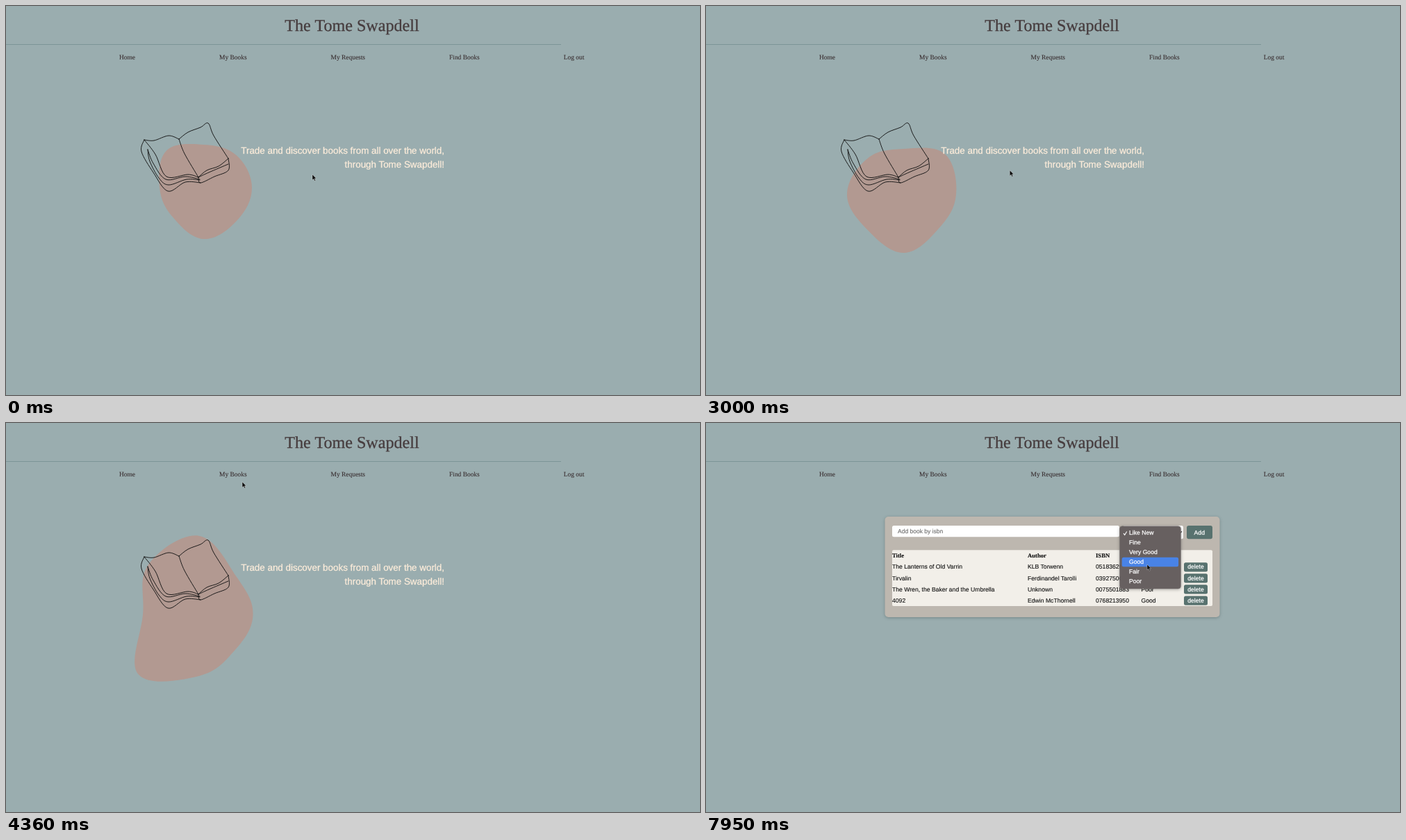
An HTML page that plays this animation: 999x561 px, repeating every 8 s.

```html
<!DOCTYPE html>
<html lang="en">
<head>
<meta charset="utf-8">
<title>The Tome Swapdell</title>
<style>
  html, body { margin: 0; width: 100%; height: 100%; overflow: hidden; background: #9aadaf; }
  svg { display: block; width: 100%; height: 100%; text-rendering: geometricPrecision; }
  text {
    font: 8.63px "Liberation Sans", Arial, sans-serif; color: #111;
    fill: currentColor; stroke: currentColor; stroke-width: .12;
  }
  .serif { font-family: "Liberation Serif", Times, serif; }
  .title { font-size: 24.1px; color: #463c3e; stroke-width: .3; }
  .nav { font-size: 9.43px; color: #3a3032; }
  .hero { font-size: 13.4px; color: #faebd9; text-anchor: end; stroke-width: .3; }
  .head { font-weight: bold; }
  .hint { font-size: 8.5px; color: #6c6c6c; }
  .light { color: #fff; stroke-width: .25; }
  .mid { text-anchor: middle; }
  .panel { filter: drop-shadow(0 1px 2px rgba(60, 75, 75, .4)); }
  .menu { filter: drop-shadow(0 1px 2px rgba(0, 0, 0, .3)); }
</style>
</head>
<body>
<svg viewBox="0 0 999 561">
  <text class="serif title mid" x="498" y="35.6">The Tome Swapdell</text>
  <path d="M0 55.5H799" stroke="#7c9597"/>
  <text class="serif nav" id="nav" x="163" y="77.4"></text>

  <g id="home">
    <path id="blob" fill="#b29991"/>
    <path id="book" fill="none" stroke="#151515" stroke-width=".95" stroke-linecap="round" stroke-linejoin="round"/>
    <text class="hero" x="631" y="212.6">Trade and discover books from all over the world,</text>
    <text class="hero" x="631" y="233">through Tome Swapdell!</text>
  </g>

  <g id="books">
    <rect class="panel" x="257.5" y="135" width="482" height="145" rx="5" fill="#bdb7af"/>
    <rect x="268" y="148" width="327" height="16.3" rx="2.5" fill="#fff"/>
    <text class="hint" x="276" y="159">Add book by isbn</text>
    <rect x="600" y="148" width="87" height="19.3" rx="2.5" fill="#fff"/>
    <text x="608" y="160.6" style="font-size:9.2px">Like New</text>
    <path d="M679.8 156.4l2.5 2.6 2.5-2.6" fill="none" stroke="#222" stroke-width="1.3"/>
    <rect x="692" y="148" width="37" height="19.3" rx="3" fill="#58726f"/>
    <text class="light mid" x="710.3" y="160.6">Add</text>
    <rect x="268" y="183.3" width="461" height="80.6" rx="2" fill="#f2efe9"/>
    <g id="table"></g>
  </g>

  <g id="menu">
    <rect class="menu" x="595.5" y="148.7" width="88" height="90.3" rx="4" fill="#676060" stroke="#7b7474" stroke-width=".5"/>
    <rect id="pick" x="598.7" width="81.4" height="13.6" rx="2.5" fill="#4983e6"/>
    <path d="M601 159.2l1.7 2.3 3-5" fill="none" stroke="#fff" stroke-width="1.1"/>
    <g id="items"></g>
  </g>

  <path id="cursor" d="M0 0V8L1.9 6.3L3.2 9.2L4.5 8.6L3.2 5.8H5.6Z" fill="#080808" stroke="#fff" stroke-opacity=".65" stroke-width=".5"/>
</svg>
<script>
const $ = id => document.getElementById(id);
const label = (x, y, text, cls = "") => `<text x="${x}" y="${y}" class="${cls}">${text}</text>`;
const clamp = v => Math.min(1, Math.max(0, v));
const ease = p => p * p * (3 - 2 * p);
const mix = (a, b, k) => a.map((v, i) => v + (b[i] - v) * k);

// Smooth curve through points, open or closed
function curve(points, closed) {
  const n = points.length;
  const at = i => points[closed ? (i + n) % n : Math.min(n - 1, Math.max(0, i))];
  const handle = (i, s) => at(i).map((v, j) => v + s * (at(i + 1)[j] - at(i - 1)[j]));
  const tension = closed ? .1875 : 1 / 6;
  let d = "M" + points[0];
  for (let i = 0; i < (closed ? n : n - 1); i++)
    d += `C${handle(i, tension)} ${handle(i + 1, -tension)} ${at(i + 1)}`;
  return d;
}

$("nav").innerHTML = ["Home", "My Books", "My Requests", "Find Books", "Log out"]
  .map((name, i) => `<tspan dx="${i && 121}">${name}</tspan>`).join("");

const columns = [268, 463, 561, 626.5];
const rows = [
  ["Title", "Author", "ISBN", "Condition"],
  ["The Lanterns of Old Varrin", "KLB Torwenn", "0518362947", "Like New"],
  ["Tirvalin", "Ferdinandel Tarolli", "0392750618", "Very Good"],
  ["The Wren, the Baker and the Umbrella", "Unknown", "0075501883", "Poor"],
  ["4092", "Edwin McThornell", "0768213950", "Good"]
];
$("table").innerHTML = rows.map((row, r) => {
  const y = 194.4 + r * 16.07;
  const cells = row.map((text, c) => label(columns[c], y, text, r ? "" : "serif head")).join("");
  return r ? cells + `<rect x="688" y="${y - 9.3}" width="34" height="13.3" rx="2.5" fill="#58726f"/>`
    + label(705, y, "delete", "light mid") : cells;
}).join("");

const itemTop = 151.9, itemStep = 13.95;
$("items").innerHTML = ["Like New", "Fine", "Very Good", "Good", "Fair", "Poor"]
  .map((name, i) => label(609, itemTop + 9.5 + i * itemStep, name, "light")).join("");

// Pen strokes of the open book
$("book").setAttribute("d", [
  "199,193 213,194 234,187 249,192",
  "249,192 262,182 280,175 291,169 299,187 320,220",
  "249,192 257,213 277,247",
  "199,193 215,214 231,246 262,243 277,247",
  "204,207 212,227 230,250 258,246 279,250",
  "204,207 207,224 220,248 234,258 260,250 279,251",
  "199,193 195,210 212,240 233,267 258,254 280,255",
  "277,247 289,237 306,231 320,220",
  "277,247 292,240 320,228",
  "320,220 320,237 300,246 280,255 277,247"
].map(s => curve(s.split(" ").map(p => p.split(",").map(Number)))).join(""));

// Blob shapes: centre, then radii every 45 degrees clockwise from the top
const round = [285, 262, 62, 66, 69, 67, 74, 62, 64, 76];
const egg = [290, 270, 80, 52, 55, 69, 75, 65, 57, 67];
const heart = [285, 272, 66, 83, 75, 70, 84, 73, 82, 74];
const pear = [280, 275, 98, 79, 77, 72, 87, 106, 81, 93];

function blob(t) {
  const [x, y, ...radii] =
    t < 1620 ? mix(round, egg, 1 - (1 - clamp(t / 1320)) ** 3) :
    t < 3000 ? mix(egg, heart, ((t - 1620) / 1380) ** 1.7) :
    mix(heart, pear, (t - 3000) / 910);
  return curve(radii.map((r, i) => {
    const a = i * Math.PI / 4;
    return [x + r * Math.sin(a), y - r * Math.cos(a)];
  }), true);
}

// Pointer moves: start, end, x, y
const moves = [
  [2950, 3390, 342, 80], [3950, 4100, 338, 72], [4300, 4540, 351, 152], [4960, 5180, 434, 112],
  [5900, 6400, 645, 157], [6560, 6710, 639, 182], [6740, 7170, 635, 204]
];
const pointer = t => moves.reduce(
  (pos, [from, to, ...end]) => mix(pos, end, ease(clamp((t - from) / (to - from)))), [441, 243]);

const show = (id, on) => $(id).style.display = on ? "" : "none";

function draw() {
  const t = performance.now() % 8000;
  const home = t < 4400;
  show("home", home);
  show("books", !home);
  show("menu", t >= 6380);
  if (home) $("blob").setAttribute("d", blob(t));
  // The highlight trails the pointer slightly
  const picked = Math.max(0, Math.floor((pointer(t - 60)[1] - itemTop) / itemStep));
  $("pick").setAttribute("y", itemTop + picked * itemStep);
  $("cursor").setAttribute("transform", `translate(${pointer(t)})`);
  requestAnimationFrame(draw);
}
draw();
</script>
</body>
</html>
```
